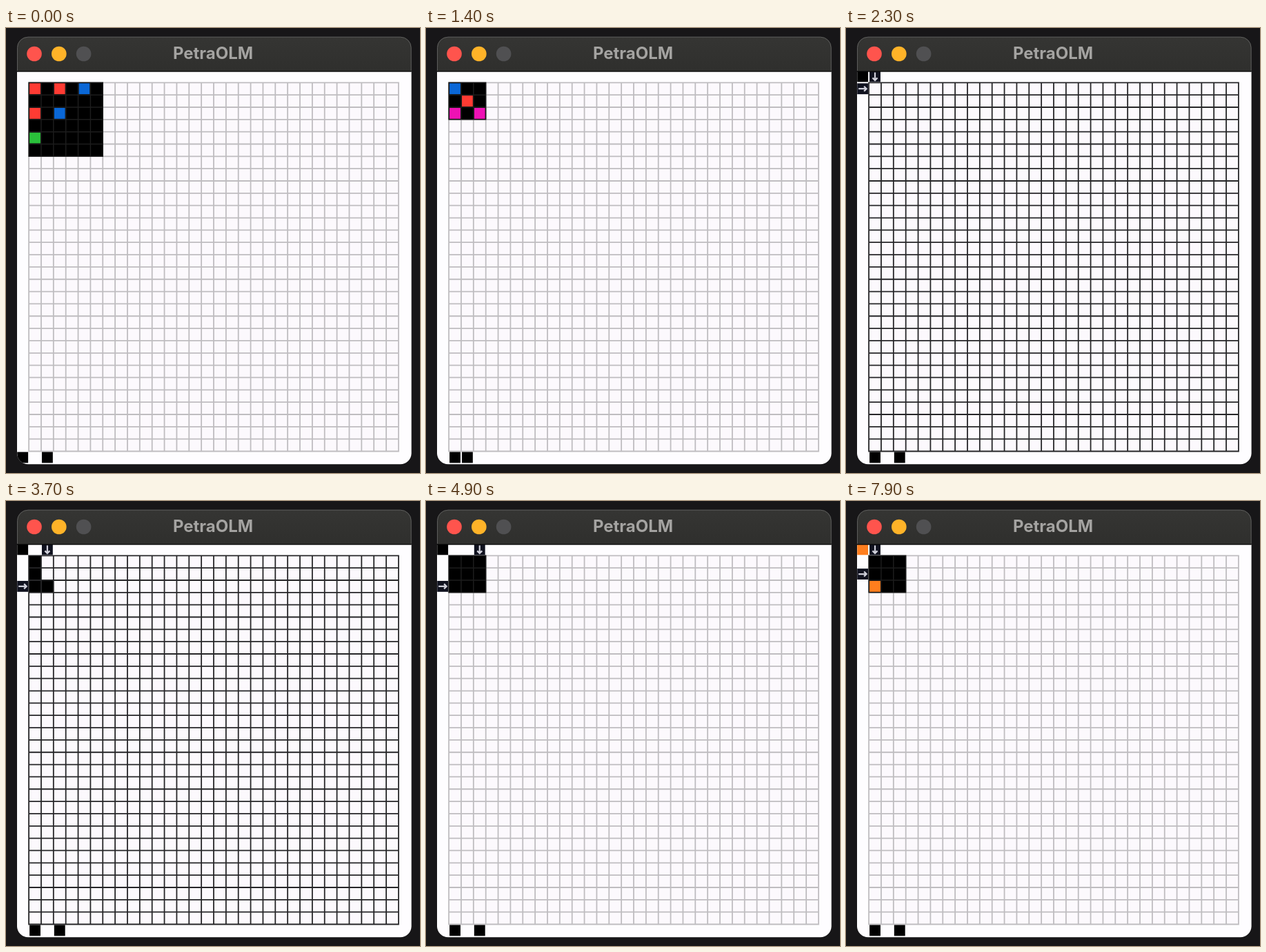
These frames come from a looping animation (600 by 646 pixels, 8000 ms). An HTML page with a canvas:

```html
<!DOCTYPE html>
<html lang="en">
<head>
<meta charset="utf-8">
<title>Grid editor</title>
<style>
html, body { margin: 0; height: 100%; overflow: hidden; background: #171618; }
canvas { display: block; }
</style>
</head>
<body>
<canvas id="stage" width="600" height="646"></canvas>
<script>
const ctx = document.getElementById("stage").getContext("2d");
const LOOP = 8000, N = 30, PITCH = 17.86, PITCH_Y = 17.84, X0 = 33.1, Y0 = 79.3;
const COLORS = ["#000", "#0a67d6", "#ff3b33", "#2ac03b", "#ffdc10", "#aaa", "#ee12b4", "#ff7e1e"];
const INPUT = ["202010", "000000", "201000", "000000", "300000", "000000"];
// Each coloured cell moves on to the next palette entry.
const OUTPUT = INPUT.map(row => row.replace(/[1-9]/g, d => +d + 1));
const TEST = ["100", "020", "606"];
// Snake path through the 3x3 area as [column, row].
const PATH = [[0, 0], [0, 1], [0, 2], [1, 2], [1, 1], [1, 0], [2, 0], [2, 1], [2, 2]];
const COLOR_TIMES = [6500, 6600, 6700, 6800, 6900, 7100, 7200];

const colX = c => X0 + c * PITCH;
const rowY = r => Y0 + r * PITCH_Y;

function rect(x, y, w, h, color) {
  ctx.fillStyle = color;
  ctx.fillRect(x, y, w, h);
}

function tile(c, r, color) {
  rect(colX(c) + 1, rowY(r) + 1, PITCH - 2, PITCH_Y - 2, color);
}

function grid(n, color, width) {
  ctx.strokeStyle = color;
  ctx.lineWidth = width;
  ctx.lineCap = "square";
  ctx.beginPath();
  for (let i = 0; i <= n; i++) {
    ctx.moveTo(colX(i), Y0);
    ctx.lineTo(colX(i), rowY(n));
    ctx.moveTo(X0, rowY(i));
    ctx.lineTo(colX(n), rowY(i));
  }
  ctx.stroke();
}

function arrow(c, r, angle) {
  tile(c, r, "#10121f");
  ctx.save();
  ctx.translate(colX(c + 0.5), rowY(r + 0.5));
  ctx.rotate(angle);
  ctx.strokeStyle = "#d0d0da";
  ctx.lineWidth = 2.2;
  ctx.lineCap = "butt";
  ctx.beginPath();
  ctx.moveTo(-6, 0);
  ctx.lineTo(5.5, 0);
  ctx.moveTo(2, -3.5);
  ctx.lineTo(5.5, 0);
  ctx.lineTo(2, 3.5);
  ctx.stroke();
  ctx.restore();
}

function windowShape(inset) {
  ctx.beginPath();
  ctx.roundRect(16 + inset, 12.7 + inset, 571.6 - 2 * inset, 620.6 - 2 * inset, 16 - inset);
}

function titleBar() {
  const shade = ctx.createLinearGradient(0, 13, 0, 63);
  shade.addColorStop(0, "#353533");
  shade.addColorStop(1, "#2f2f2d");
  rect(16, 12, 572, 51, shade);
  rect(16, 62.5, 572, 1.2, "#050505");
  ["#ff544d", "#ffb328", "#505052"].forEach((color, i) => {
    ctx.fillStyle = color;
    ctx.beginPath();
    ctx.arc(41 + i * 35.8, 37.5, 10.8, 0, Math.PI * 2);
    ctx.fill();
  });
  ctx.fillStyle = "#a4a3a1";
  ctx.font = "bold 24px Inter, sans-serif";
  ctx.textAlign = "center";
  ctx.fillText("PetraOLM", 300, 45);
}

// Light line inside the title bar's outer edge.
function rim() {
  ctx.save();
  ctx.beginPath();
  ctx.rect(0, 0, 600, 62);
  ctx.clip();
  ctx.strokeStyle = "#5c5c5b";
  ctx.lineWidth = 1;
  windowShape(0.5);
  ctx.stroke();
  ctx.restore();
}

function showExample(rows) {
  const n = rows.length;
  rect(X0, Y0, n * PITCH, n * PITCH_Y, "#000");
  rows.forEach((row, r) => [...row].forEach((d, c) => tile(c, r, COLORS[d])));
  grid(n, "#1c1c1c", 1.5);
}

function showEditor(t) {
  const color = COLOR_TIMES.filter(at => t >= at).length;
  const painted = Math.max(0, Math.min(9, Math.floor((t - 2900) / 200)));
  const moved = Math.max(0, Math.min(8, Math.floor((t - 3000) / 200)));
  let [col, row] = PATH[moved];
  if (t >= 5300) col = t < 5400 ? 1 : 0;
  if (t >= 7600) row = 1;

  for (const [c, r] of PATH.slice(0, painted)) {
    rect(colX(c), rowY(r), PITCH, PITCH_Y, "#000");
  }
  if (t >= 7400) tile(0, 2, COLORS[7]);
  if (t < 4900) grid(N, "#262628", 1.8);
  else grid(3, "#1c1c1c", 1.5);

  tile(-1, -1, COLORS[color]);
  arrow(col, -1, Math.PI / 2);
  arrow(-1, row, 0);
}

function draw(t) {
  rect(0, 0, 600, 646, "#171618");
  ctx.save();
  windowShape(0);
  ctx.clip();
  rect(16, 63, 572, 571, "#fefdff");
  rect(X0, Y0, N * PITCH, N * PITCH_Y, "#fcf9fd");
  if (t < 1600 || t >= 4900) grid(N, "#bfbdc0", 1.8);

  if (t < 100) showExample(INPUT);
  else if (t < 1100) showExample(OUTPUT);
  else if (t < 1600) showExample(TEST);
  else showEditor(t);

  const showsInput = t < 100 || (t >= 1100 && t < 1600);
  tile(t < 1100 ? -1 : 0, N, "#000");
  tile(showsInput ? 1 : 2, N, "#000");
  titleBar();
  ctx.restore();
  rim();
}

const start = performance.now();
function frame() {
  draw((performance.now() - start) % LOOP);
  requestAnimationFrame(frame);
}
frame();
</script>
</body>
</html>
```
